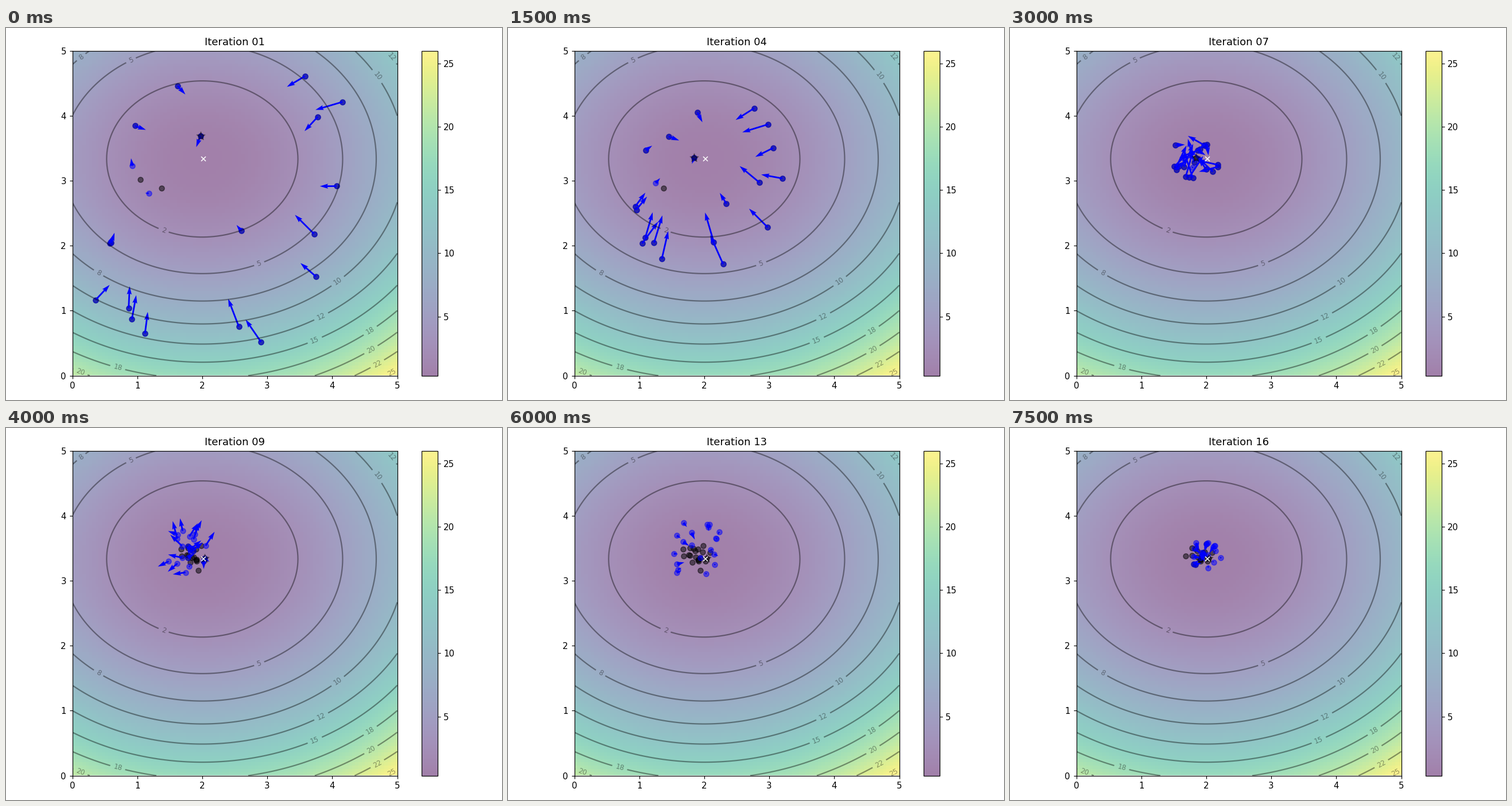
A matplotlib script that plays this animation: 864x648 px, repeating every 8 s.

```python
import numpy as np
import matplotlib.pyplot as plt
from matplotlib.animation import FuncAnimation

WIDTH, HEIGHT, DPI = 864, 648, 108
W, C1, C2 = 0.8, 0.1, 0.1
N_PARTICLES = 20
N_STEPS = 16

# where the contour labels sit, in data units
LABEL_SPOTS = [
    (1.41, 2.25), (2.87, 1.74), (0.90, 4.86), (0.41, 1.59),
    (0.13, 4.91), (4.08, 1.46), (4.71, 4.62), (3.83, 0.91),
    (4.93, 4.92), (3.73, 0.55), (4.58, 0.70), (0.70, 0.13),
    (4.59, 0.41), (0.13, 0.07), (4.69, 0.19), (4.91, 0.06),
]


def f(x, y):
    return (x - 2) ** 2 + (y - 3) ** 2 + 0.5 * (y - 4) ** 2


def run_swarm():
    """Return (position, velocity, own best, swarm best) for every step."""
    rng = np.random.RandomState(100)
    X = rng.rand(2, N_PARTICLES) * 5
    V = rng.randn(2, N_PARTICLES) * 0.1
    pbest, pbest_obj = X.copy(), f(*X)
    gbest = pbest[:, pbest_obj.argmin()]
    states = []
    for _ in range(N_STEPS + 1):
        r1, r2 = rng.rand(2)
        V = W * V + C1 * r1 * (pbest - X) + C2 * r2 * (gbest.reshape(-1, 1) - X)
        X = X + V
        obj = f(*X)
        pbest = np.where(obj <= pbest_obj, X, pbest)
        pbest_obj = np.minimum(obj, pbest_obj)
        gbest = pbest[:, pbest_obj.argmin()]
        states.append((X, V, pbest, gbest))
    return states[1:]  # the first step is never shown


def place(axes, left, top, width, height):
    """Put axes at a pixel box measured from the top left corner."""
    axes.set_position([left / WIDTH, 1 - (top + height) / HEIGHT,
                       width / WIDTH, height / HEIGHT])


states = run_swarm()
X, V, pbest, gbest = states[0]

x, y = np.meshgrid(np.linspace(0, 5, 100), np.linspace(0, 5, 100))
z = f(x, y)
lowest = z.argmin()

plt.rcParams["font.family"] = "DejaVu Sans"
fig, ax = plt.subplots(figsize=(WIDTH / DPI, HEIGHT / DPI), dpi=DPI)
img = ax.imshow(z, extent=[0, 5, 0, 5], origin="lower", cmap="viridis", alpha=0.5)
bar = fig.colorbar(img, ax=ax)
ax.plot(x.flat[lowest], y.flat[lowest], marker="x", markersize=5, color="white")
contours = ax.contour(x, y, z, 10, colors="black", alpha=0.4)
ax.clabel(contours, inline=True, fontsize=8, fmt="%.0f", manual=LABEL_SPOTS)

pbest_plot = ax.scatter(*pbest, marker="o", color="black", alpha=0.5)
p_plot = ax.scatter(*X, marker="o", color="blue", alpha=0.5)
p_arrow = ax.quiver(*X, *V, color="blue", width=0.005,
                    angles="xy", scale_units="xy", scale=1)
gbest_plot = ax.scatter(*gbest, marker="*", s=100, color="black", alpha=0.4)
ax.set_xlim(0, 5)
ax.set_ylim(0, 5)
place(ax, 115.5, 39.5, 566, 566)
place(bar.ax, 723.5, 39.5, 30, 566)


def animate(i):
    X, V, pbest, gbest = states[i]
    ax.set_title(f"Iteration {i + 1:02d}")
    pbest_plot.set_offsets(pbest.T)
    p_plot.set_offsets(X.T)
    p_arrow.set_offsets(X.T)
    # arrow angles are measured from XY, so keep it in step with the offsets
    p_arrow.XY = X.T
    p_arrow.set_UVC(*V)
    gbest_plot.set_offsets(gbest.reshape(1, -1))
    return pbest_plot, p_plot, p_arrow, gbest_plot


anim = FuncAnimation(fig, animate, frames=N_STEPS, interval=500,
                     blit=False, repeat=True)

plt.show()
```
